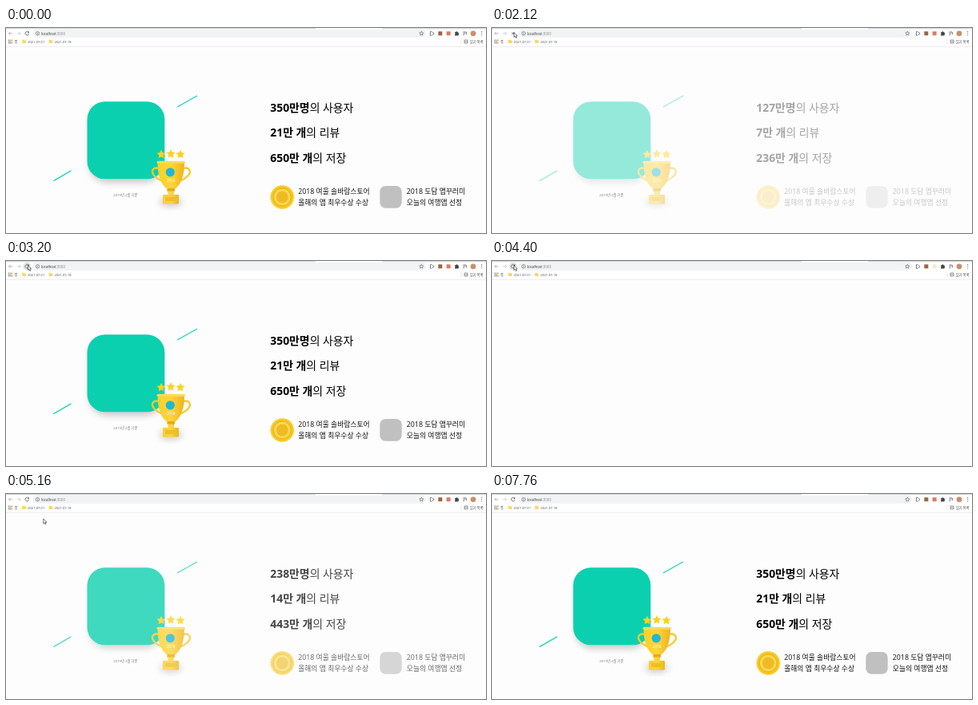
Animation of 600x257 px, one loop 8600 ms. Source, as an HTML page:

```html
<!DOCTYPE html>
<html lang="ko">
<head>
<meta charset="utf-8">
<title>사용자 지표</title>
<style>
  html, body { margin: 0; width: 100%; height: 100%; overflow: hidden; background: #fff; }
  svg { display: block; width: 600px; height: 257px; }
  text { font-family: "Open Sans", "Noto Sans CJK KR", "Noto Sans CJK", sans-serif; }
  .stat { font-size: 13.9px; fill: #000; }
  .stat tspan:first-child { font-weight: 700; }
  .award { font-size: 8.8px; fill: #111; }
  .mark { font-size: 4px; fill: #444; }
  .line { fill: none; stroke: #555; stroke-width: .8; }
</style>
</head>
<body>
<svg viewBox="0 0 600 257" xmlns="http://www.w3.org/2000/svg">
  <defs>
    <filter id="soft" x="-40%" y="-40%" width="180%" height="180%"><feGaussianBlur stdDeviation="4"/></filter>
    <linearGradient id="gold" x1="0" x2="1">
      <stop offset="0" stop-color="#fbd02a"/><stop offset=".5" stop-color="#fcd53a"/><stop offset="1" stop-color="#eeb41c"/>
    </linearGradient>
  </defs>
  <rect width="600" height="257" fill="#fefdfe"/>

  <!-- browser bar -->
  <rect width="600" height="23" fill="#fff"/>
  <path d="M0 .5H387M470 .5H600" stroke="#d5d8dc" stroke-width="1.4"/>
  <rect y="22.8" width="600" height=".8" fill="#ebe6eb"/>
  <rect x="33" y="1.7" width="492" height="10.2" rx="5.1" fill="#f1f3f4"/>
  <path class="line" d="M8 6.8H3.4M5.4 4.8L3.4 6.8L5.4 8.8" style="stroke:#aaa"/>
  <path class="line" d="M13.6 6.8H18.2M16.2 4.8L18.2 6.8L16.2 8.8" style="stroke:#c8c8c8"/>
  <circle id="hover" cx="26.3" cy="6.8" r="5" fill="#e4e5e7"/>
  <path id="reload" class="line" d="M28.2 5.4A2.3 2.3 0 1 0 28.5 7.5M28.5 4.2V5.9H26.8"/>
  <path id="stop" class="line" d="M24.7 5.2L27.9 8.4M27.9 5.2L24.7 8.4"/>
  <circle class="line" cx="39.5" cy="6.8" r="2.2" style="stroke-width:.6"/>
  <path class="line" d="M39.5 6.4V8M39.5 5.4V5.8" style="stroke-width:.6"/>
  <text x="44" y="8.5" font-size="4.45" fill="#333">localhost<tspan fill="#888">:3000</tspan></text>
  <path id="fav" class="line" style="stroke-width:.6"/>
  <path class="line" d="M532.2 4.6H530.4V9.2H532.2M533 4.8L534.8 6.9L533 9"/>
  <rect x="540.3" y="4.3" width="5" height="5" fill="#9a6544"/>
  <rect id="ext" x="550.6" y="4.3" width="5" height="5" fill="#dd7a62"/>
  <path d="M561 5.2H562.4A1 1 0 0 1 564.4 5.2H565.5V6.5A1 1 0 0 1 565.5 8.4V9.6H561V8.2A.9 .9 0 0 0 561 6.5Z" fill="#444"/>
  <path class="line" d="M571.4 5H575M571.4 6.8H574M571.4 8.6H573M575.4 5V8.3"/>
  <circle cx="584" cy="6.8" r="3.4" fill="#c98f6c"/>
  <path d="M594.7 4.6v.01M594.7 6.8v.01M594.7 9v.01" stroke="#444" stroke-width="1.1" stroke-linecap="round"/>

  <g id="apps"></g>
  <text class="mark" x="10.6" y="18.6">앱</text>
  <path d="M20.3 14.8H22.4L23 15.5H25V19H20.3ZM53.6 14.8H55.7L56.3 15.5H58.3V19H53.6Z" fill="#f8d662"/>
  <text class="mark" x="27.3" y="18.5">2021-07-01</text>
  <text class="mark" x="60.6" y="18.5">2021-07-18</text>
  <path d="M569 13.5V20.5" stroke="#ddd" stroke-width=".6"/>
  <path class="line" d="M573 15H577V19H573ZM573 17H577" style="stroke-width:.6"/>
  <text class="mark" x="580" y="18.6" style="font-size:4.2px">읽기 목록</text>

  <!-- page -->
  <g id="hero">
    <rect x="104" y="99" width="91" height="95" rx="22" fill="#000" opacity=".2" filter="url(#soft)"/>
    <rect x="101.5" y="92.3" width="96.8" height="97" rx="22" fill="#0bd0af"/>
    <path d="M214 99L239 85M59.4 191.6L81.4 178.8" stroke="#1fd3b4" stroke-width="1.4"/>
    <ellipse cx="206" cy="218" rx="14" ry="6" opacity=".2" filter="url(#soft)"/>
    <g id="stars" fill="#fcd21c"></g>
    <path d="M191 176C184 174 181 179 184.500 184C187 188 191 190 196 192M221.500 176C228.500 174 232 179 228.500 184C226 188 221.500 190 217 192" fill="none" stroke="#f7c925" stroke-width="2.3"/>
    <path d="M189.500 168H223C223 184 219.500 196 210.500 202.500L209.500 210H203L202 202.500C193 196 189.500 184 189.500 168Z" fill="url(#gold)"/>
    <rect x="188.500" y="166.800" width="35.500" height="3" rx="1.500" fill="#fbdb59"/>
    <path d="M202 201H210.500L211.500 204.500H201Z" fill="#e7a91b"/>
    <rect x="196" y="209" width="20" height="11.5" rx="1.2" fill="url(#gold)"/>
    <rect x="199" y="212" width="14" height="5" fill="#f0bd2a"/>
    <circle cx="205.300" cy="180.800" r="5.600" fill="#20b8d4"/>
    <text x="206" y="192.600" font-size="4.800" fill="#fff" text-anchor="middle">2018</text>
  </g>
  <text id="caption" x="134.300" y="211" font-size="4.250" fill="#777">2019년 2월 기준</text>
  <g id="stats">
    <text class="stat" x="330.300" y="104.800"><tspan></tspan><tspan>의 사용자</tspan></text>
    <text class="stat" x="330.300" y="136.300"><tspan></tspan><tspan>의 리뷰</tspan></text>
    <text class="stat" x="330.300" y="167.800"><tspan></tspan><tspan>의 저장</tspan></text>
  </g>
  <g id="awards">
    <circle cx="345.300" cy="212" r="14.400" fill="#f6c51f" stroke="#fad64c" stroke-width="1.600" stroke-dasharray="2.300 1.470"/>
    <circle cx="345.300" cy="212" r="11" fill="#fbd94f" stroke="#e0a510" stroke-width=".8"/>
    <circle cx="345.300" cy="212" r="7.500" fill="#eebb22"/>
    <text class="award" x="365.200" y="207.700">2018 여울 솔바람스토어</text>
    <text class="award" x="365.200" y="222.300">올해의 앱 최우수상 수상</text>
    <rect x="467.300" y="198" width="27.400" height="27.700" rx="7" fill="#c0c0c0"/>
    <text class="award" x="500.800" y="207.700">2018 도담 앱꾸러미</text>
    <text class="award" x="500.800" y="222.300">오늘의 여행앱 선정</text>
  </g>
  <path id="cursor" d="M0 0V6L1.400 4.800L2.400 7L3.400 6.500L2.400 4.400H4.200Z" fill="#fff" stroke="#222" stroke-width=".6"/>
</svg>
<script>
const LOOP = 8600, STEP = 40;
const COUNT = 1080, FADE = 900;
// blank: page goes empty, start: its content begins to appear
const loads = [{ blank: 1760, start: 1838.9 }, { blank: 4400, start: 4583.4 }];
const stats = [[350, "만명"], [21, "만 개"], [650, "만 개"]];

const $ = id => document.getElementById(id);
const nums = [...document.querySelectorAll(".stat tspan:first-child")];
const clamp = x => Math.min(1, Math.max(0, x));
const ease = x => 1 - Math.pow(1 - clamp(x), 1.5);
const show = (id, on) => $(id).setAttribute("opacity", +on);

function star(cx, cy, r) {
  let d = "";
  for (let i = 0; i < 10; i++) {
    const a = (i * 36 - 90) * Math.PI / 180, k = i % 2 ? r * .5 : r;
    d += (i ? "L" : "M") + (cx + k * Math.cos(a)).toFixed(2) + " " + (cy + k * Math.sin(a)).toFixed(2);
  }
  return d + "Z";
}

$("fav").setAttribute("d", star(519.3, 6.9, 2.7));
$("stars").innerHTML = [[194, 158.6], [206, 157.8], [218, 158.6]]
  .map(([x, y]) => `<path d="${star(x, y, 5.7)}"/>`).join("");
const dots = ["#d9665b", "#e5b64c", "#5f9e6b", "#6a90cf"];
for (let i = 0; i < 9; i++)
  $("apps").innerHTML += `<rect x="${3 + i % 3 * 1.8}" y="${14.6 + (i / 3 | 0) * 1.8}" width="1.3" height="1.3" fill="${dots[i % 4]}"/>`;

// pointer moves: from time, to time, start point, end point, speed exponent
const moves = [
  [280, 1040, 247, 254, 27.5, 5.5, x => 1 - (1 - x) ** 2],
  [1040, 4920, 27.5, 5.5, 27.5, 5.5, x => x],
  [4920, 5080, 27.5, 5.5, 34, 22, x => x * x],
  [5080, 5760, 34, 22, 366, 258, x => x * x * (3 - 2 * x)],
  [5960, 6120, 364, 250, 379, 254, x => x],
  [6760, 6840, 596, 254.5, 596, 256, x => x],
  [7680, 7760, 575, 239, 381, 123, x => x]
];

function pointer(t) {
  const m = moves.find(m => t >= m[0] && t < m[1]);
  show("cursor", !!m);
  if (!m) return;
  const [a, b, x0, y0, x1, y1, f] = m, k = f((t - a) / (b - a));
  $("cursor").setAttribute("transform", `translate(${x0 + (x1 - x0) * k} ${y0 + (y1 - y0) * k})`);
}

function draw(t) {
  const load = loads.filter(l => t >= l.blank).pop();
  const age = load ? t - load.start : LOOP;
  const p = ease(age / COUNT);

  show("caption", age >= 0);
  [["hero", 0], ["stats", 60], ["awards", 140]].forEach(([id, delay]) =>
    $(id).setAttribute("opacity", ease((age - delay) / FADE)));
  stats.forEach(([n, unit], i) => nums[i].textContent = Math.floor(n * p) + unit);

  const loading = t >= 1840 && t < 3200;
  show("stop", loading);
  show("reload", !loading);
  show("hover", t >= 1000 && t < 5000 && !loading);
  const faint = loads.some(l => t >= l.blank && t < l.start - 40);
  $("ext").setAttribute("fill", faint ? "#f6ecd2" : "#dd7a62");
  pointer(t);
}

const t0 = performance.now();
function tick() {
  const t = (performance.now() - t0) % LOOP;
  draw(Math.floor(t / STEP) * STEP);
  requestAnimationFrame(tick);
}
tick();
</script>
</body>
</html>
```
